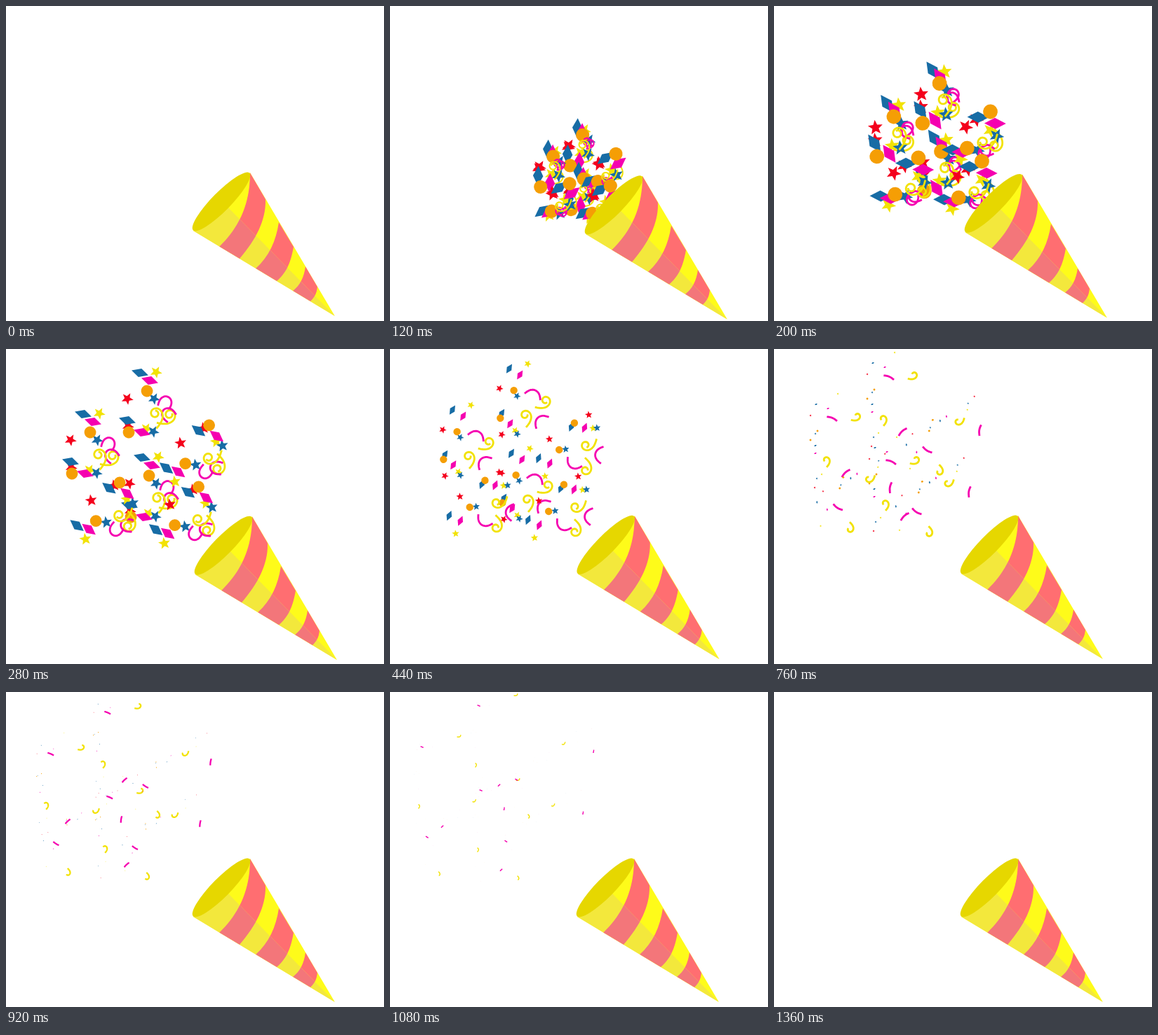
Recreate the animation shown at these times as an HTML page. Size 539 px wide and 450 px high, loop 9360 ms.

```html
<!DOCTYPE html>
<html lang="en">
<head>
<meta charset="utf-8">
<title>Party popper</title>
<style>
html, body { margin: 0; width: 100%; height: 100%; overflow: hidden; background: #fff; }
svg { display: block; width: 539px; height: 450px; }
</style>
</head>
<body>
<svg viewBox="0 0 539 450" xmlns="http://www.w3.org/2000/svg">
  <defs>
    <clipPath id="body"><path d="M267 321L469 443L348 238L300 270Z"/></clipPath>
    <clipPath id="lower"><path d="M255 226L317 288L469 443L250 322Z"/></clipPath>
    <path id="stripes" d="M348 238C348 275 338 311 304 344L333 361C358 332 371 304 370 276Z
      M389 309C385 336 375 358 356 375L386 393C399 382 406 368 410 344Z
      M427 372C425 388 419 399 409 407L434 422C440 416 443 411 444 401Z"/>
    <g id="burst" stroke-linecap="butt"></g>
  </defs>
  <g id="confetti"></g>
  <g id="cone">
    <g clip-path="url(#body)">
      <path fill="#fefb1a" d="M250 220H480V450H250Z"/>
      <use href="#stripes" fill="#ff6e71"/>
      <g clip-path="url(#lower)">
        <path fill="#f3e83c" d="M250 220H480V450H250Z"/>
        <use href="#stripes" fill="#f3767a"/>
      </g>
    </g>
    <ellipse cx="307" cy="279.5" rx="57.3" ry="13.4" transform="rotate(-45.5 307 279.5)" fill="#e6d700"/>
  </g>
</svg>
<script>
const LOOP = 9360, STEP = 40, END = 1360, OPEN = 280;
const RED = '#f4001c', YELLOW = '#f2e205', BLUE = '#176ca5', PINK = '#f500b0', ORANGE = '#f59e05';
const NS = 'http://www.w3.org/2000/svg';
const RAD = Math.PI / 180;

const star = 'M' + Array.from({ length: 10 }, (_, i) => {
  const a = i * Math.PI / 5 - 1.3, r = i % 2 ? 0.46 : 1.06;
  return `${r * Math.cos(a)} ${r * Math.sin(a)}`;
}).join('L') + 'Z';
const diamond = 'M-1.48 -.1L.1 -.76L1.48 .1L-.1 .76Z';
const disc = 'M-1 0A1 1 0 1 1 1 0A1 1 0 1 1 -1 0Z';

// Ribbons uncurl and shorten as q falls from 1 to 0.
const arch = {
  length: q => 65 * q ** 1.7,
  heading: (u, q) => 200 * q ** 3 * Math.sin(Math.PI * (u - 0.5))
};
const curl = {
  length: q => 105 * q ** 1.7,
  heading: (u, q) => -620 * q * u * u
};

// Shape, colour, place when the burst is open, place when nearly faded, tilt.
const PARTS = [
  [star, RED, [173, 71], [133, 36]],
  [star, YELLOW, [214, 33], [172, 5]],
  [star, BLUE, [211, 71], [140, 62]],
  [diamond, BLUE, [191, 34], [141, 20]],
  [diamond, PINK, [205, 45], [158, 26]],
  [disc, ORANGE, [201, 60], [143, 58]],
  [arch, PINK, [228, 75], [164, 40], 23],
  [curl, YELLOW, [232, 98], [199, 39], 12],

  [star, RED, [174, 110], [139, 139]],
  [star, YELLOW, [200, 114], [149, 120]],
  [star, BLUE, [210, 118], [142, 126]],
  [diamond, BLUE, [173, 102], [140, 79]],
  [diamond, PINK, [194, 119], [140, 90]],
  [disc, ORANGE, [175, 119], [133, 71]],
  [arch, PINK, [230, 92], [183, 118], -43],
  [curl, YELLOW, [216, 95], [157, 101], -50]
];

// The burst is repeated three times as it is and three times mirrored.
const COPIES = [[0, 0], [-81, 59], [3, 121]].map(p => ['1 0 0 1', p])
  .concat([[92.5, 32], [-35, 114], [77.5, 120]].map(p => ['.566 .824 .824 -.566', p]));

const cone = document.getElementById('cone');
const confetti = document.getElementById('confetti');
const burst = document.getElementById('burst');

function add(parent, tag, attrs) {
  const el = document.createElementNS(NS, tag);
  for (const k in attrs) el.setAttribute(k, attrs[k]);
  return parent.appendChild(el);
}

const parts = PARTS.map(([shape, color, from, to, tilt]) => {
  const ribbon = typeof shape === 'object';
  const look = ribbon ? { fill: 'none', stroke: color } : { fill: color, d: shape };
  return { el: add(burst, 'path', look), shape, ribbon, from, to, tilt };
});
for (const [m, p] of COPIES) {
  add(confetti, 'use', { href: '#burst', transform: `matrix(${m} ${p.join(' ')})` });
}

// Path that follows its heading, centred on its own middle.
function trace(shape, q) {
  const n = 32, step = shape.length(q) / n, pts = [[0, 0]];
  for (let i = 0; i < n; i++) {
    const a = shape.heading((i + 0.5) / n, q) * RAD, [x, y] = pts[i];
    pts.push([x + step * Math.cos(a), y + step * Math.sin(a)]);
  }
  const mid = k => pts.reduce((s, p) => s + p[k], 0) / pts.length;
  const cx = mid(0), cy = mid(1);
  return 'M' + pts.map(([x, y]) => `${(x - cx).toFixed(2)} ${(y - cy).toFixed(2)}`).join('L');
}

// Drift that is 0 at OPEN and 1 at 760 ms; keep is the speed left after 320 ms.
const drift = (t, keep) => (1 - keep ** ((t - OPEN) / 320)) / (1 - keep ** 1.5);

function recoil(t) {
  if (t >= END) return 0;
  return 12 * (t < 120 ? Math.sin(Math.PI / 2 * t / 120) : 2 ** ((120 - t) / 80));
}

function draw(t) {
  const r = recoil(t);
  cone.setAttribute('transform', `translate(${r} ${r * 0.4})`);
  const live = t > 0 && t < END;
  confetti.setAttribute('display', live ? 'inline' : 'none');
  if (!live) return;

  const q = 1 - t / END;
  const spread = 1 - Math.max(0, 1 - t / OPEN) ** 1.305;
  const grow = Math.min(1, t / 160) / spread;
  const size = 16.8 * q ** 3 * grow;
  const spin = 13 - 0.47 * (t - OPEN);
  confetti.setAttribute('transform', `translate(320 317) scale(${spread}) translate(-320 -317)`);

  for (const { el, shape, ribbon, from, to, tilt } of parts) {
    const k = drift(t, ribbon ? 0.9 : 0.6);
    const [x, y] = from.map((v, i) => v + (to[i] - v) * k);
    el.setAttribute('transform',
      `translate(${x} ${y}) rotate(${ribbon ? tilt : spin}) scale(${ribbon ? grow : size})`);
    if (ribbon) {
      el.setAttribute('d', trace(shape, q));
      el.setAttribute('stroke-width', 2.8 * Math.min(1, q * 2.5));
    }
  }
}

const start = performance.now();
let shown = -1;
function frame() {
  const now = (performance.now() - start) % LOOP;
  const t = Math.min(END, Math.floor(now / STEP) * STEP);
  if (t !== shown) draw(shown = t);
  requestAnimationFrame(frame);
}
frame();
</script>
</body>
</html>
```
